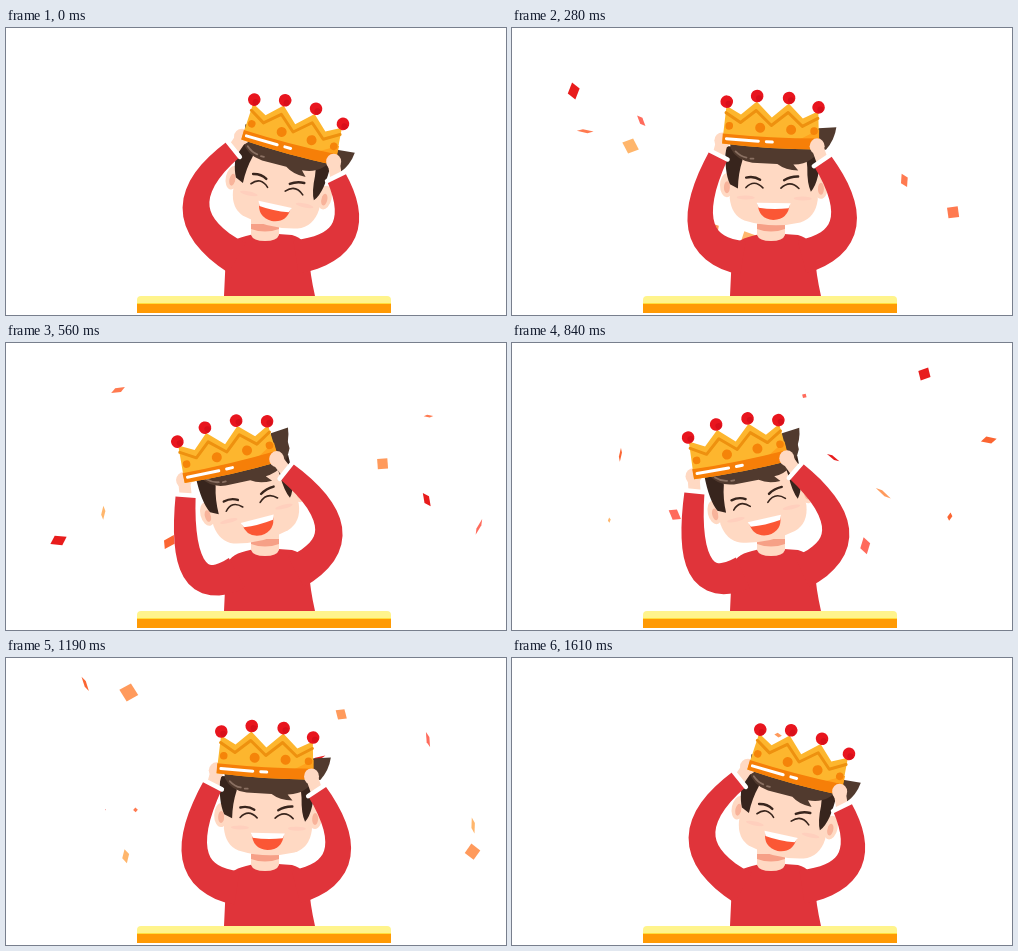
An HTML page with a canvas for the animation above (1680 ms loop, 500 px wide and 287 px high).

```html
<!DOCTYPE html>
<html lang="en">
<head>
<meta charset="utf-8">
<title>Crown celebration</title>
<style>
html, body { margin: 0; width: 100%; height: 100%; overflow: hidden; background: #fff; }
canvas { display: block; }
</style>
</head>
<body>
<canvas id="stage" width="500" height="287"></canvas>
<script>
const ctx = document.getElementById('stage').getContext('2d');
const LOOP = 1680, STEP = 70, RAD = Math.PI / 180;
const RED = '#e0343a', SKIN = '#ffd9c3', HAIR = '#513a2e', DARK = '#38251d';
const PAPER = ['#ff9a5c', '#ff6b5c', '#fb6532', '#e81c1c', '#ffb66c', '#ff7a50'];

function fill(path, color) {
  ctx.fillStyle = color;
  ctx.fill(new Path2D(path));
}

function line(path, color, width) {
  ctx.strokeStyle = color;
  ctx.lineWidth = width;
  ctx.stroke(new Path2D(path));
}

function oval(x, y, rx, ry, color) {
  ctx.fillStyle = color;
  ctx.beginPath();
  ctx.ellipse(x, y, rx, ry, 0, 0, 7);
  ctx.fill();
}

function randomFrom(seed) {
  return () => (seed = seed * 16807 % 2147483647) / 2147483647;
}

// Quick sway to the left, slower return, short rest on the right
function poseAt(t) {
  const phase = t < 640 ? t / 640 : Math.min(2, 1 + (t - 640) / 970);
  const tilt = 0.7 + 14.6 * Math.cos(Math.PI * phase);
  return { tilt, x: 251 + 2.72 * tilt, y: 76.5 + 0.048 * (tilt - 3) ** 2 };
}

// Crown coordinates to stage coordinates
function onStage({ x, y, tilt }, dx, dy) {
  const c = Math.cos(tilt * RAD), s = Math.sin(tilt * RAD);
  return [x + dx * c - dy * s, y + dx * s + dy * c];
}

function makeConfetti(count) {
  const random = randomFrom(2024);
  return Array.from({ length: count }, (_, i) => ({
    birth: 70 + 1290 * i / count,
    life: 270 + 50 * random(),
    x: 20 + 470 * random(),
    y: 20 + 195 * random(),
    size: 10 + 4 * random(),
    angle: Math.PI * random(),
    turn: Math.PI * random(),
    color: PAPER[Math.floor(PAPER.length * random())]
  }));
}

function drawConfetti(bits, t) {
  for (const b of bits) {
    const age = t - b.birth;
    if (age < 0 || age > b.life) continue;
    const scale = Math.min(1, (b.life - age) / STEP) * b.size;
    ctx.save();
    ctx.translate(b.x, b.y + age * 0.026);
    ctx.rotate(b.angle);
    ctx.scale(scale, scale * Math.max(0.18, Math.abs(Math.cos(b.turn + age * 0.003))));
    ctx.rotate(0.5);
    ctx.fillStyle = b.color;
    ctx.fillRect(-0.5, -0.5, 1, 1);
    ctx.restore();
  }
}

// Sleeve: a bent curve that widens from wrist to shoulder
function drawArm(hand, elbow, shoulder) {
  const reach = 15 / Math.hypot(elbow[0] - hand[0], elbow[1] - hand[1]);
  const wrist = hand.map((v, k) => v + (elbow[k] - v) * reach);
  const bend = elbow.map((v, k) => v + 0.9 * (v - (wrist[k] + shoulder[k]) / 2));
  const near = [], far = [];
  for (let i = 0; i <= 16; i++) {
    const u = i / 16, v = 1 - u, half = 10 + 7 * u;
    const [x, y] = wrist.map((w, k) => v * v * w + 2 * u * v * bend[k] + u * u * shoulder[k]);
    const [dx, dy] = wrist.map((w, k) => v * (bend[k] - w) + u * (shoulder[k] - bend[k]));
    const n = half / Math.hypot(dx, dy);
    near.push([x - dy * n, y + dx * n]);
    far.unshift([x + dy * n, y - dx * n]);
  }
  line(`M${hand}L${wrist}`, SKIN, 12);
  fill(`M${near.concat(far).join('L')}Z`, RED);
  line(`M${near[0]}L${far[16]}`, '#fff', 4.5);
}

function drawBody() {
  fill('M218 268L220 225Q222 212 240 208L248 206H272L286 207Q301 211 303 228Q304 246 309 268Z', RED);
  fill('M245 190H273V207Q271 213 259 213Q247 213 245 207Z', SKIN);
  fill('M245 196H273V201Q259 206 245 201Z', '#f6a087');
}

function drawHead(tilt) {
  ctx.save();
  ctx.translate(259, 214);
  ctx.rotate((tilt - 2.5) * 0.95 * RAD);
  ctx.translate(-259, -215);
  for (const x of [214, 308]) {
    oval(x, 159, 7, 12, SKIN);
    oval(x, 161, 3, 6, '#f8b39a');
  }
  fill('M217 125V172Q219 189 232 194Q260 202 288 195Q303 190 305 172V125Z', SKIN);
  fill('M212 120Q211 146 217 158L225 162Q225 147 229 134V120Z', DARK);
  fill('M292 122L294 140Q294 156 298 164Q307 154 307 122Z', DARK);
  fill('M215 104L217 122Q223 134 239 136L264 137Q272 143 285 143L280 137Q300 137 310 116V104Z', HAIR);
  line('M222 125Q227 130 233 131M237 132H240', '#8a7062', 1.8);
  line('M233 151Q241 149 247 153M271 153Q277 149 285 149', DARK, 2.4);
  line('M233 161Q241 152 250 161M268 161Q277 152 286 161', DARK, 1.6);
  oval(233, 171, 9, 2, '#ffcfbd');
  oval(290, 171, 9, 2, '#ffcfbd');
  fill('M245 177H277Q276 192 261 193Q246 192 245 177Z', '#fb5735');
  fill('M244 176H278L276 181Q260 183 246 181Z', '#fff');
  ctx.restore();
}

function drawCrown({ x, y, tilt }) {
  ctx.save();
  ctx.translate(x, y);
  ctx.rotate(tilt * RAD);
  const lift = 0.5 * tilt;
  fill(`M47 ${19 + lift}L65 ${17 + lift}Q64 ${30 + lift} 56 ${40 + lift}H44Z`, HAIR);
  fill('M-46 4L-31 12L-16 -2L0 13L16 -2L31 12L46 4L49 42Q0 45-48 42Z', '#fdb62e');
  fill('M49 42L48 22L14 42Z', '#ffa21c');
  line('M-46 11L-31 20L-16 7L0 21L16 7L31 20L46 11', '#ee910f', 3);
  for (const dot of [-42, -11, 20, 43]) {
    const r = Math.abs(dot) > 30 ? 3.8 : 5;
    oval(dot, 24, r, r, '#f58409');
  }
  fill('M-48 32Q0 34 49 31L49 42Q0 45-48 42Z', '#f67f08');
  line('M-44 37L-12 37.5M-4 37.5H2', '#fff', 3);
  for (const ball of [-46, -16, 16, 46]) {
    const top = Math.abs(ball) > 30 ? 0 : -7.5;
    oval(ball, top, 6.3, 6.3, '#e8151e');
    oval(ball + 2, top + 2, 3, 3, '#d80f1a');
  }
  ctx.restore();
}

function drawTable() {
  fill('M131 276V272Q131 268 135 268H381Q385 268 385 272V276Z', '#fff48c');
  fill('M131 275H385V285H131Z', '#ffdf3d');
  fill('M131 276H385V285H131Z', '#ff9a05');
}

const confetti = makeConfetti(46);

function draw(t) {
  const pose = poseAt(t), { tilt } = pose;
  const leftHand = onStage(pose, -48, 39), rightHand = onStage(pose, 47, 39);
  ctx.fillStyle = '#fff';
  ctx.fillRect(0, 0, 500, 287);
  ctx.lineCap = ctx.lineJoin = 'round';
  drawConfetti(confetti, t);
  drawBody();
  drawHead(tilt);
  drawArm(leftHand, [188, 206 - 1.75 * tilt], [231, 230]);
  oval(...leftHand, 8, 8, SKIN);
  drawCrown(pose);
  drawArm(rightHand, [331 + 0.5 * tilt, 194 + 0.65 * tilt], [290, 229]);
  oval(...rightHand, 7.5, 8, SKIN);
  drawTable();
}

const start = performance.now();
function tick() {
  const t = (performance.now() - start) % LOOP;
  draw(Math.floor(t / STEP) * STEP);
  requestAnimationFrame(tick);
}
tick();
</script>
</body>
</html>
```
